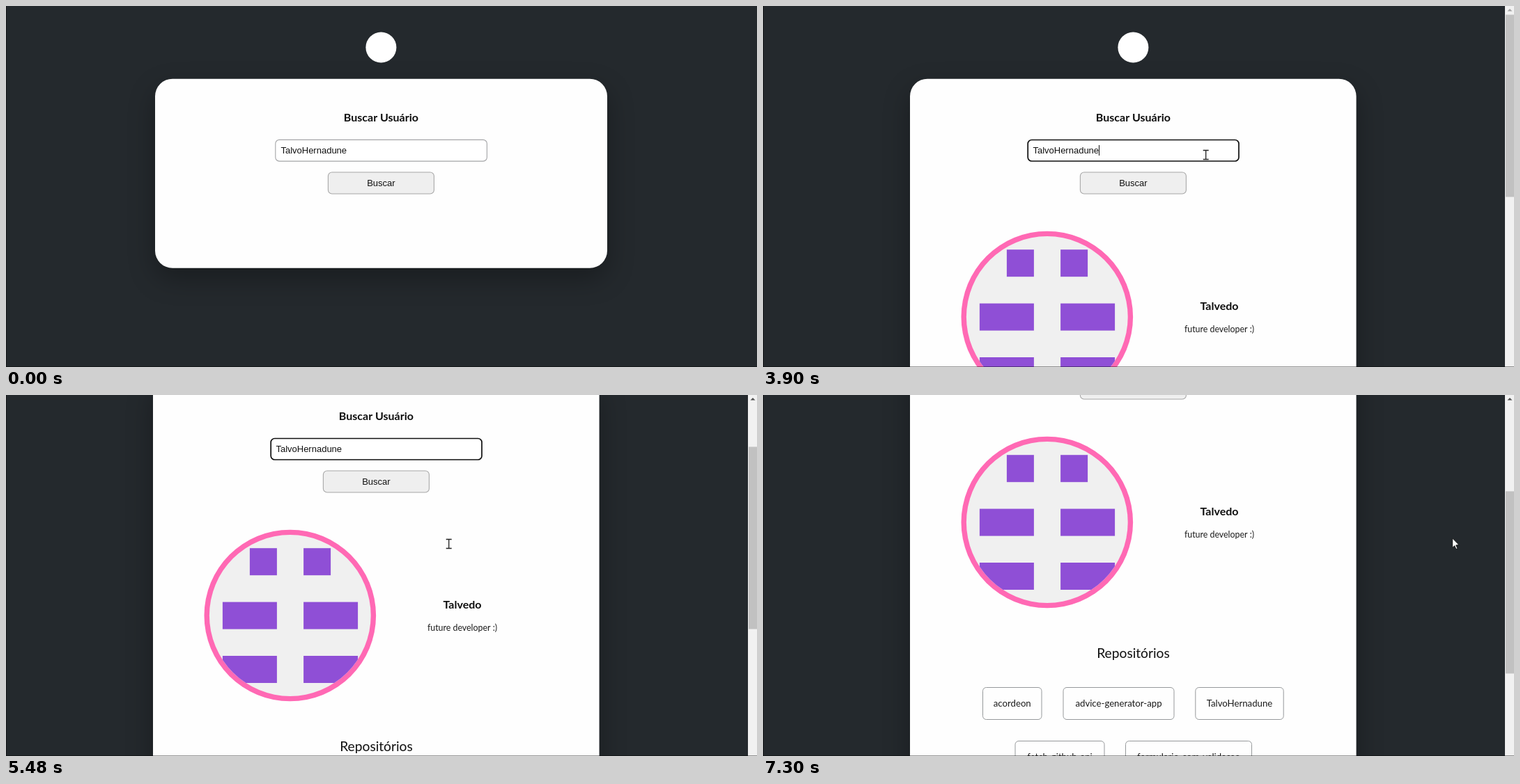
Write an HTML page with a canvas that moves like this. It is 1078 px wide and 519 px high and loops after 8 s.

```html
<!DOCTYPE html>
<html lang="pt-BR">
<head>
<meta charset="utf-8">
<title>Buscar Usuário</title>
<style>
  html, body { margin: 0; width: 100%; height: 100%; overflow: hidden; background: #24292d; }
  canvas { display: block; width: 1078px; height: 519px; }
</style>
</head>
<body>
<canvas id="stage" width="1078" height="519"></canvas>
<script>
const ctx = document.getElementById('stage').getContext('2d');
const W = 1078, H = 519, LOOP = 8000;
const SANS = 'Lato, "Open Sans", sans-serif';
const ARIAL = '"Liberation Sans", Arial, sans-serif';
const USER = 'TalvoHernadune';

const lerp = (a, b, p) => a + (b - a) * p;
const clamp = p => Math.max(0, Math.min(1, p));

// Time held on n evenly spaced steps from a to b
function stepped(t, a, b, n) {
  const i = Math.min(n - 1, Math.floor((t - a) / (b - a) * (n - 1) + 1e-6));
  return a + i * (b - a) / (n - 1);
}

function box(x, y, w, h, r, fill, stroke, line = 1) {
  ctx.beginPath();
  ctx.roundRect(x, y, w, h, r);
  if (fill) { ctx.fillStyle = fill; ctx.fill(); }
  if (stroke) { ctx.strokeStyle = stroke; ctx.lineWidth = line; ctx.stroke(); }
}

function text(str, x, y, font, color = '#0d0d0d', align = 'center') {
  ctx.font = font;
  ctx.fillStyle = color;
  ctx.textAlign = align;
  ctx.fillText(str, x, y);
}

function disc(x, y, r, fill) {
  ctx.beginPath();
  ctx.arc(x, y, r, 0, Math.PI * 2);
  ctx.fillStyle = fill;
  ctx.fill();
}

const wheel = p => 1 - Math.pow(1 - Math.pow(clamp(p), 1.3), 1.6);

function scrollAt(t) {
  if (t < 4760) return 0;
  if (t < 6390) return Math.round(132 * wheel((stepped(t, 4760, 5600, 14) - 4705) / 815));
  return Math.round(132 + 132 * wheel((stepped(t, 6390, 7300, 14) - 6313) / 900));
}

function caretOn(t) {
  if (t < 1770) return false;
  if (t < 2840) return t < 2320;
  if (t >= 5870) return t >= 6000 && t < 6520;
  return Math.floor((t - 2840) / 530) % 2 === 0 && t < 5470;
}

function pointerAt(t) {
  if (t < 240) return null;
  if (t < 690) {
    const p = (stepped(t, 240, 430, 4) - 240) / 190;
    const e = 1 - (1 - p) ** 2;
    return { x: lerp(925, 772, e), y: lerp(444, 348, e) };
  }
  if (t < 5870) {
    const s = stepped(t, 690, 1300, 10);
    const p = clamp((s - 650) / 550);
    const e = p * p * (3 - 2 * p);
    const back = clamp((s - 1200) / 100);
    const x = lerp(772, 629, e) + 6.7 * back;
    const y = lerp(348, 212, e) + 2 * back;
    return { x, y, beam: x < 691 && y < 224 };
  }
  const p = (stepped(t, 5870, 6000, 3) - 5870) / 130;
  return { x: lerp(735, 989.7, 1 - (1 - p) ** 1.6), y: lerp(212, 206, p * p) };
}

function drawPointer({ x, y, beam }) {
  ctx.save();
  ctx.translate(x, y);
  ctx.beginPath();
  if (beam) {
    ctx.moveTo(-4, -6.5); ctx.lineTo(4, -6.5);
    ctx.moveTo(-4, 6.5); ctx.lineTo(4, 6.5);
    ctx.moveTo(0, -6.5); ctx.lineTo(0, 6.5);
    ctx.strokeStyle = '#222';
    ctx.lineWidth = 1.3;
    ctx.stroke();
  } else {
    ctx.moveTo(0, 0);
    for (const [px, py] of [[0, 13.5], [3, 10.7], [5.2, 15.6], [7.2, 14.7], [5, 9.9], [9.3, 9.6]]) ctx.lineTo(px, py);
    ctx.closePath();
    ctx.fillStyle = '#fff';
    ctx.fill();
    ctx.strokeStyle = '#111';
    ctx.lineWidth = 0.9;
    ctx.stroke();
  }
  ctx.restore();
}

function drawForm(cx, focused, caret) {
  disc(cx, 59.5, 22, '#fff');
  text('Buscar Usuário', cx, 165.5, `bold 16px ${SANS}`);
  if (focused) box(cx - 151.2, 192.5, 302.8, 30.5, 5.5, '#fff', '#101010', 1.7);
  else box(cx - 151.6, 192.4, 303.6, 30.7, 5.5, '#fff', '#a4a5a7', 1.1);
  text(USER, cx - 144, 212.3, `13px ${ARIAL}`, '#111', 'left');
  if (caret) {
    ctx.fillStyle = '#111';
    ctx.fillRect(Math.floor(cx - 49), 200, 1, 15);
  }
  box(cx - 76, 239, 152, 31, 5.5, '#efefef', '#a8a8a8', 1.1);
  text('Buscar', cx, 259, `13px ${ARIAL}`, '#111');
}

function drawAvatar(x, y) {
  disc(x, y, 123.3, '#ff69b4');
  ctx.save();
  ctx.beginPath();
  ctx.arc(x, y, 115.9, 0, Math.PI * 2);
  ctx.clip();
  ctx.fillStyle = '#f0f0f0';
  ctx.fillRect(x - 120, y - 120, 240, 240);
  ctx.fillStyle = '#8f4fd6';
  [39, 78, 78].forEach((w, row) => {
    const top = y - 96.8 + row * 77.4;
    ctx.fillRect(x - 18.9 - w, top, w, 39);
    ctx.fillRect(x + 19.3, top, w, 39);
  });
  ctx.restore();
}

const repos = [
  ['acordeon', 315.5, 684.5, 84.5],
  ['advice-generator-app', 431, 684.5, 159],
  [USER, 620.8, 684.5, 126.4],
  ['fetch-github-api', 362, 761.5, 128],
  ['formulario-com-validacao', 520.5, 761.5, 181]
];

function drawProfile() {
  drawAvatar(407.8, 447);
  text('Talvedo', 655, 436.5, `bold 16px ${SANS}`);
  text('future developer :)', 655, 468.5, `12.4px ${SANS}`, '#1a1a1a');
  text('Repositórios', 531.5, 641.5, `19.2px ${SANS}`, '#111');
  for (const [name, x, y, w] of repos) {
    box(x, y, w, 46, 5, null, '#96999b');
    text(name, x + w / 2, y + 27.6, `13.2px ${SANS}`, '#1a1a1a');
  }
}

function drawScrollbar(off) {
  ctx.fillStyle = '#f1f1f1';
  ctx.fillRect(1065, 0, 13, H);
  ctx.fillStyle = '#c1c1c1';
  ctx.fillRect(1066, 12.5 + off * 0.477, 12, 262);
  ctx.beginPath();
  ctx.moveTo(1068.5, 7.5);
  ctx.lineTo(1072, 4);
  ctx.lineTo(1075.5, 7.5);
  ctx.fillStyle = off ? '#505050' : '#a3a3a3';
  ctx.fill();
}

function draw(t) {
  const found = t >= 2840;
  const off = scrollAt(t);
  ctx.fillStyle = '#24292d';
  ctx.fillRect(0, 0, W, H);

  ctx.save();
  ctx.translate(0, -off);
  ctx.save();
  ctx.shadowColor = 'rgba(0,0,0,.3)';
  ctx.shadowBlur = 38;
  ctx.shadowOffsetY = 15;
  if (found) box(211, 104.7, 640.6, 900, 25, '#fefefe');
  else box(214, 104.7, 649, 272, 25, '#fefefe');
  ctx.restore();
  drawForm(found ? 531.4 : 538.4, t >= 1770, caretOn(t));
  if (found) drawProfile();
  ctx.restore();

  if (found) drawScrollbar(off);
  ctx.fillStyle = 'rgba(0,0,0,.4)';
  ctx.fillRect(0, 0, 1, H);
  ctx.fillRect(0, H - 1, W, 1);

  if (t >= 1770 && t < 1970) disc(634.3, 213.5, 10, '#fdf578');
  const pointer = pointerAt(t);
  if (pointer) drawPointer(pointer);
}

const start = performance.now();
function tick() {
  draw((performance.now() - start) % LOOP);
  requestAnimationFrame(tick);
}
tick();
</script>
</body>
</html>
```
